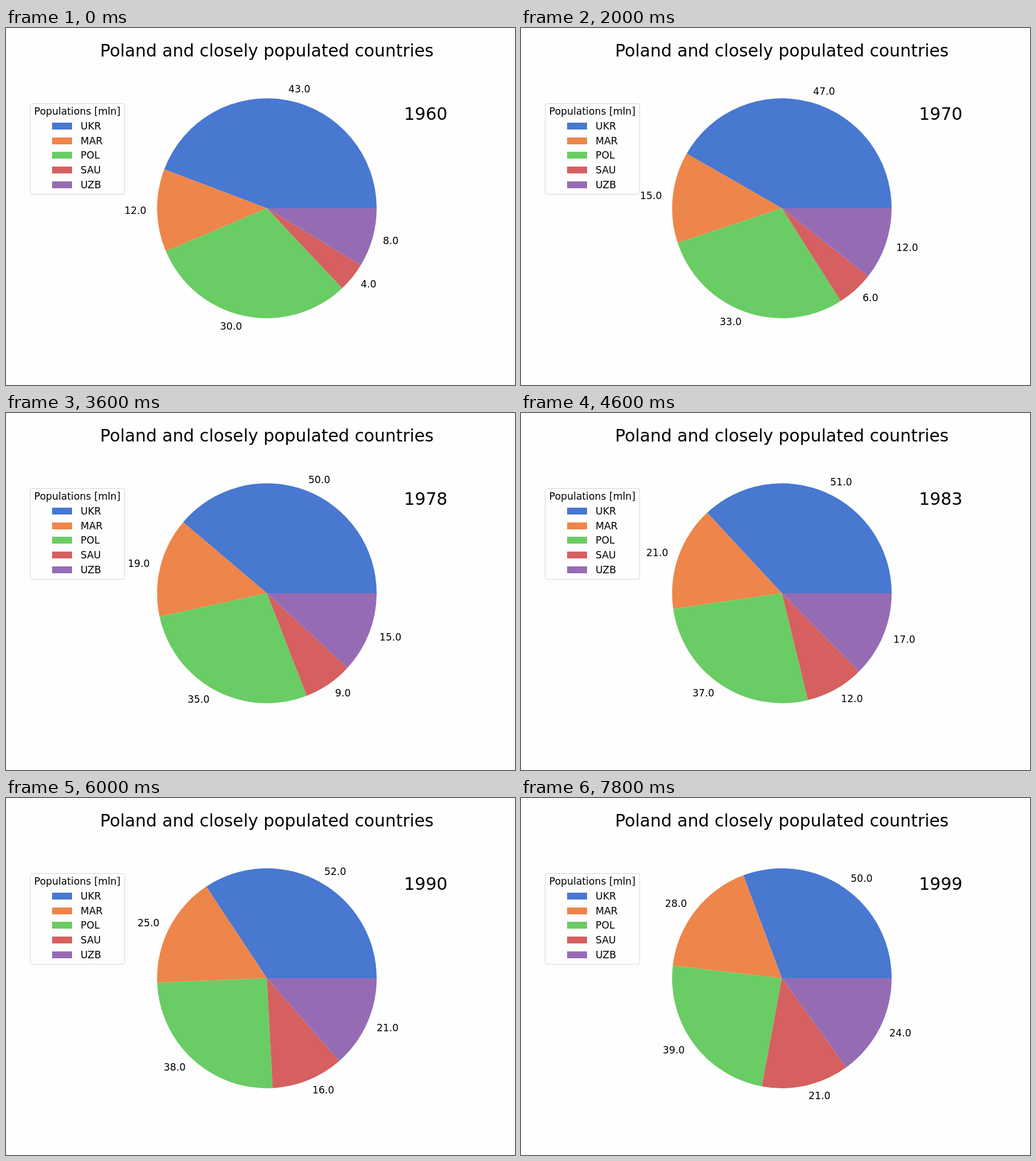
An HTML page for the animation above (8000 ms loop, 894x626 px).

```html
<!DOCTYPE html>
<html lang="en">
<head>
<meta charset="utf-8">
<title>Population pie</title>
<style>
  html, body { margin: 0; width: 100%; height: 100%; overflow: hidden; background: #fefefe; }
  svg { display: block; font: 17.3px "DejaVu Sans", sans-serif; }
  .title { font-size: 29.85px; text-anchor: middle; }
  .year { font-size: 30px; }
</style>
</head>
<body>
<svg id="stage" width="894" height="626" viewBox="0 0 894 626">
  <text class="title" x="458.2" y="50">Poland and closely populated countries</text>
  <text class="year" id="year" x="699" y="161"></text>
  <rect x="42.5" y="132.5" width="166" height="159" rx="3.5" fill="none" stroke="#d6d6d6"/>
  <text x="125.3" y="152" text-anchor="middle">Populations [mln]</text>
</svg>
<script>
const FIRST_YEAR = 1960, YEAR_COUNT = 40, YEAR_MS = 200;
const CX = 458.2, CY = 316.1, RADIUS = 192.8, LABEL_RADIUS = RADIUS * 1.1;
const LABEL_WIDTH = 38.5, LABEL_DROP = 5.5;

// Millions of people in the key years; a smooth curve runs through them.
const keyYears = [1960, 1970, 1980, 1990, 1999];
const countries = [
  { code: "UKR", color: "#4878d0", values: [42.8, 47.2, 50.05, 51.9, 49.67] },
  { code: "MAR", color: "#ee854a", values: [11.77, 15.15, 19.6, 24.7, 28.25] },
  { code: "POL", color: "#6acc64", values: [29.64, 32.7, 35.7, 38.11, 38.66] },
  { code: "SAU", color: "#d65f5f", values: [4.17, 6.1, 10.2, 16.05, 20.85] },
  { code: "UZB", color: "#956cb4", values: [8.37, 12, 16, 20.5, 24.3] }
];

const stage = document.getElementById("stage");
const yearText = document.getElementById("year");

function setAll(node, attributes) {
  for (const name in attributes) node.setAttribute(name, attributes[name]);
}

function add(tag, attributes, text = "") {
  const node = document.createElementNS(stage.namespaceURI, tag);
  setAll(node, attributes);
  node.textContent = text;
  return stage.appendChild(node);
}

// Lagrange polynomial through the key years.
function valueAt(values, year) {
  return values.reduce((sum, value, i) => sum + keyYears.reduce((term, key, j) =>
    j === i ? term : term * (year - key) / (keyYears[i] - key), value), 0);
}

function pointAt(angle, radius) {
  return [CX + radius * Math.cos(angle), CY - radius * Math.sin(angle)];
}

countries.forEach((country, i) => {
  const y = Math.round(178 + i * 25.7);
  add("rect", { x: 81, y: y - 12, width: 35, height: 12, fill: country.color });
  add("text", { x: 131, y }, country.code);
  country.wedge = add("path", { fill: country.color });
  country.label = add("text", {});
});

function draw(year) {
  const amounts = countries.map(country => valueAt(country.values, year));
  const total = amounts.reduce((sum, amount) => sum + amount, 0);
  let start = 0;
  countries.forEach(({ wedge, label }, i) => {
    const sweep = amounts[i] / total * 2 * Math.PI;
    const end = start + sweep;
    wedge.setAttribute("d", `M${CX} ${CY}L${pointAt(start, RADIUS)}A${RADIUS} ${RADIUS} 0 0 0 ${pointAt(end, RADIUS)}Z`);
    const [x, y] = pointAt(start + sweep / 2, LABEL_RADIUS);
    setAll(label, {
      x: Math.round(x < CX ? x - LABEL_WIDTH : x),
      y: Math.round(y + LABEL_DROP)
    });
    label.textContent = Math.round(amounts[i]).toFixed(1);
    start = end;
  });
  yearText.textContent = year;
}

let startTime, shownYear;
function tick(now) {
  startTime ??= now;
  const year = FIRST_YEAR + Math.floor((now - startTime) / YEAR_MS) % YEAR_COUNT;
  if (year !== shownYear) draw(shownYear = year);
  requestAnimationFrame(tick);
}
draw(FIRST_YEAR);
requestAnimationFrame(tick);
</script>
</body>
</html>
```
